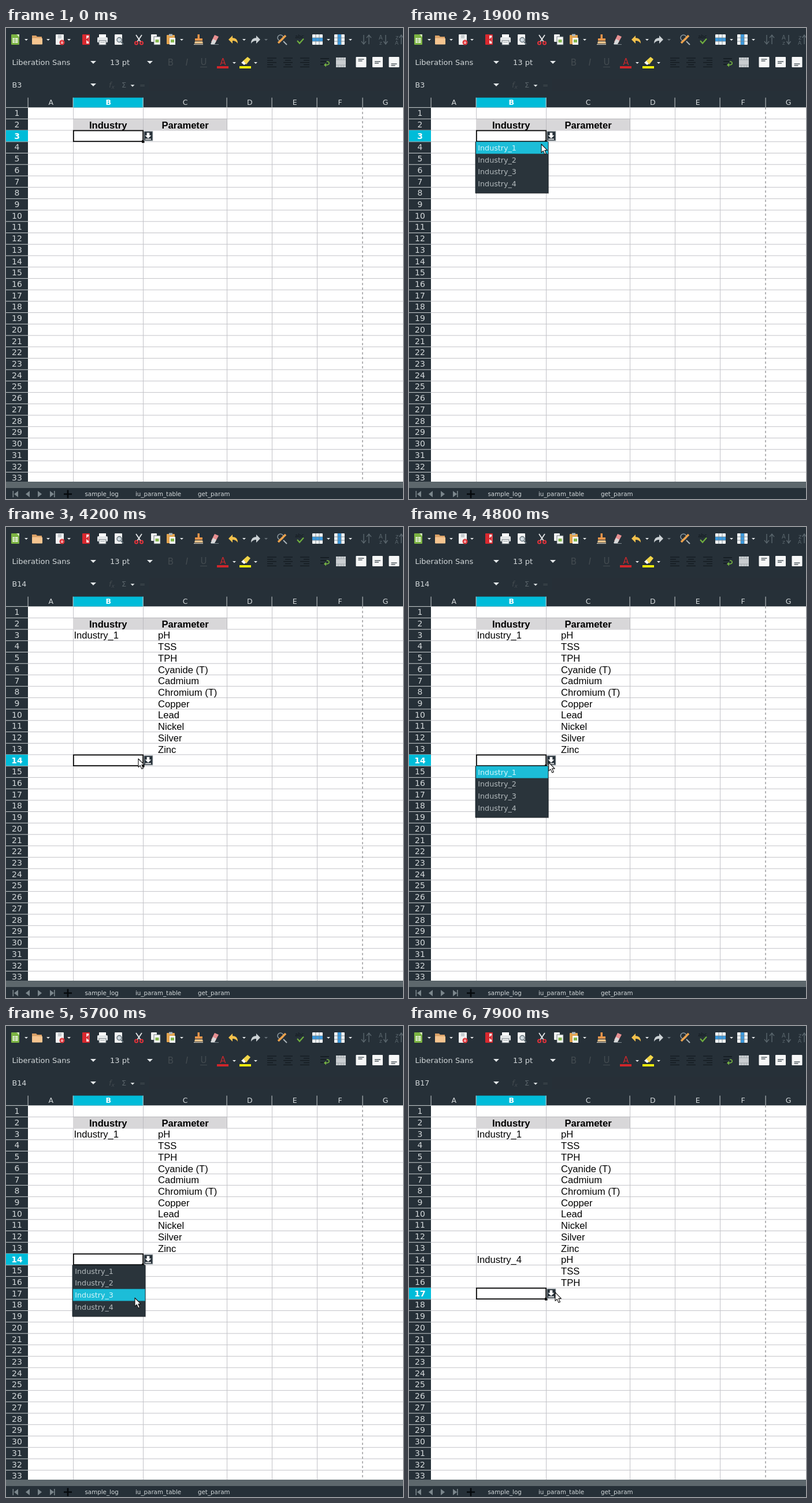
Animation of 687x815 px, one loop 8 s. Source, as an HTML page:

```html
<!DOCTYPE html>
<html lang="en">
<head>
<meta charset="utf-8">
<title>Spreadsheet dropdown</title>
<style>
html, body { margin: 0; width: 100%; height: 100%; overflow: hidden; background: #263038; }
svg { display: block; width: 687px; height: 815px; }
text { white-space: pre; }
.ui { font-family: "DejaVu Sans", sans-serif; }
.cell { font-family: "Liberation Sans", Arial, sans-serif; font-size: 16.6px; fill: #000; }
</style>
</head>
<body>
<svg viewBox="0 0 687 815" xmlns="http://www.w3.org/2000/svg">
  <g id="base"></g>
  <g id="live"></g>
</svg>
<script>
const DARK = '#263038', CYAN = '#00bcd9', PALE = '#d3d8da', DIM = '#12191e', FADED = '#434b50', GRID = '#c3c3c8';
const TOP = 137.2, ROW = 19.72, ITEM = 20.6, LOOP = 8000;
const COLS = [38, 116, 237, 382, 460, 538, 617, 695];
const PARAMS = ['pH', 'TSS', 'TPH', 'Cyanide (T)', 'Cadmium', 'Chromium (T)', 'Copper', 'Lead', 'Nickel', 'Silver', 'Zinc'];

const rowTop = n => TOP + ROW * (n - 1);
const rect = (x, y, w, h, fill, more = '') => `<rect x="${x}" y="${y}" width="${w}" height="${h}" fill="${fill}" ${more}/>`;
const path = (d, fill, more = '') => `<path d="${d}" fill="${fill}" ${more}/>`;
const stroke = (d, color, w = 1, more = '') => path(d, 'none', `stroke="${color}" stroke-width="${w}" ${more}`);
const circle = (x, y, r, fill, more = '') => `<circle cx="${x}" cy="${y}" r="${r}" fill="${fill}" ${more}/>`;
const ui = (s, x, y, size, fill = PALE, more = '') => `<text class="ui" x="${x}" y="${y}" font-size="${size}" fill="${fill}" ${more}>${s}</text>`;
const cell = (s, x, n, more = '') => `<text class="cell" x="${x}" y="${rowTop(n) + 16.8}" ${more}>${s}</text>`;
const caret = (x, y, w = 3.5, fill = '#e4e8ea') => path(`M${x - w} ${y - w / 2}h${2 * w}l${-w} ${w}z`, fill);
const MID = 'text-anchor="middle"', BOLD = 'font-weight="bold"', MID_BOLD = MID + ' ' + BOLD;

function page(x, y, w = 14, h = 18) {
  return rect(x, y, w, h, '#f1f2f2', 'rx="1"');
}

function tableIcon(x, vertical) {
  let s = rect(x - 9, 11, 18, 18, '#f3f5f6', 'rx="1"');
  s += vertical ? rect(x - 3, 11, 6, 18, '#3a9ae0') : rect(x - 9, 17, 18, 6, '#3a9ae0');
  return s + stroke(`M${x - 3} 11v18M${x + 3} 11v18M${x - 9} 17h18M${x - 9} 23h18`, '#6a7b86', .8);
}

function topIcons() {
  const sort = '#5a666d';
  let s = rect(9, 11, 14, 18, '#7bb342', 'rx="1"') + path('M18 11h5v5z', '#d4ecb8')
    + rect(11.5, 17.5, 9, 8, '#fff') + stroke('M11.5 20h9M11.5 22.8h9M15.5 17.5v8', '#7bb342');
  s += path('M45 13h7l2 2h8v13h-17z', '#d9a066') + rect(45, 17.5, 18, 11, '#f5c590', 'rx="1"');
  s += page(86, 11) + path('M90 12h6v6h-6z', '#c8cdd0') + circle(97, 25, 4.5, '#e0393e')
    + stroke('M97 22.5v4.5M95 25l2 2l2-2', '#fff');
  s += rect(132, 11, 13, 18, '#d9282f', 'rx="1"') + rect(139, 13, 4.5, 14, '#f3dcdc')
    + path('M138 20l5-4v8z', '#d9282f');
  s += rect(161, 11, 12, 6, '#fff') + rect(158, 16, 18, 9, '#e3e6e8', 'rx="1.5"')
    + rect(161, 22, 12, 7, '#fff', 'stroke="#6c767c"') + stroke('M163 25h8', '#8a9499');
  s += page(188, 11, 13) + circle(196, 20.5, 4, '#cfd9df', 'stroke="#5c6a72" stroke-width="1.3"')
    + stroke('M199 24l4 4', '#5c6a72', 2);
  s += stroke('M225 12l8 12M235 12l-8 12', '#e5e7e8', 1.8) + circle(225.5, 26, 2.5, 'none', 'stroke="#e0323a" stroke-width="2"')
    + circle(234.5, 26, 2.5, 'none', 'stroke="#e0323a" stroke-width="2"');
  s += page(251, 11, 10, 13) + rect(256, 15, 11, 14, '#f5f6f6', 'stroke="#566168" stroke-width=".8"')
    + rect(258.5, 20, 6, 5, '#86b84f');
  s += rect(278, 12, 14, 16, '#e3a44f', 'rx="1"') + rect(282, 10.5, 6, 3.5, '#aeb6ba')
    + rect(283, 17, 10, 12, '#f5f6f6') + rect(285, 20, 6, 5, '#86b84f');
  s += path('M331.5 11h3.5v7h5v4h-13v-4h4.5z', '#e8954a') + path('M327 23h13l1 4h-15z', '#e7c08a') + stroke('M325 28.5h16', '#f0e3cf');
  s += path('M361 12l7 3-6 11-7-2z', '#e78f91') + path('M358 19l6 3-3 6h-7z', '#d7d9da') + stroke('M355 28.5h13', '#7d888e');
  s += path('M385 20l7-7v4q9 0 9 10q-3-5-9-5v5z', '#f4c14c');
  s += path('M440 20l-7-7v4q-9 0-9 10q3-5 9-5v5z', '#cbd1d4');
  s += circle(475, 17, 5, 'none', 'stroke="#8a969d" stroke-width="1.6"') + stroke('M471 26l13-13', '#eca24d', 3.5)
    + stroke('M480 23l6 6', '#aab3b8', 2);
  s += ui('abc', 508, 18, 8.5, DIM, MID) + stroke('M504 22l4 4.5l7-8', '#6fae3f', 2.2);
  s += tableIcon(539, false) + tableIcon(577, true);
  s += stroke('M619 12v15M615 23l4 5l4-5M628 28v-15M624 17l4-5l4 5', sort, 1.4);
  s += ui('A', 645, 20, 10, sort) + ui('z', 646, 29, 9, sort) + stroke('M657 12v15M653.5 23l3.5 5l3.5-5', sort, 1.4);
  s += ui('z', 674, 20, 10, sort) + ui('A', 673, 29, 9, sort) + stroke('M684 28v-15M680.5 17l3.5-5l3.5 5', sort, 1.4);
  for (const x of [35, 73, 109, 304, 412, 558, 596]) s += caret(x, 20.5, 3);
  return s + caret(450, 20.5, 3, '#667178');
}

function formatIcons() {
  let s = ui('Liberation Sans', 10.5, 63.5, 13) + caret(151, 59.5, 5)
    + ui('13 pt', 180, 63.5, 13) + caret(249, 59.5, 5);
  s += ui('B', 285, 64.5, 15, FADED, MID) + ui('I', 313, 64.5, 15, FADED, MID + ' font-style="italic"')
    + ui('U', 342, 63.5, 15, FADED, MID) + stroke('M336 67.5h12', FADED);
  s += ui('A', 375.5, 64, 15, '#c0282d', MID) + rect(365, 66, 20, 4, '#d0252b');
  s += path('M409 58l9-8l5 4l-7 9z', '#f3d64a') + path('M407 60l4-3l4 5l-3 2z', '#f5f5f5') + rect(404, 66, 20, 4, '#f7f30a');
  s += caret(395, 60.5, 3) + caret(432, 60.5, 3);
  [460, 488, 517].forEach((x, k) => {
    for (let i = 0; i < 5; i++) {
      const w = i % 2 ? 10 : 16, left = x - 8 + (16 - w) * k / 2;
      s += rect(left, 51.5 + i * 3.8, w, 1.2, DIM);
    }
  });
  s += stroke('M544 53h15M544 58h10M544 63h6', DIM, 1.5) + stroke('M555 58q5 0 4 4q-1 2-6 2', '#74b043', 1.7)
    + path('M554 60.5v7l-4-3.5z', '#74b043');
  s += rect(571, 51, 17, 17, '#c9cdd0') + stroke('M571 55h17M571 64h17M575 51v4M580 51v4M584 51v4M575 64v4M580 64v4M584 64v4', '#9aa2a6', .8);
  [614.5, 643, 671.5].forEach((x, k) => {
    s += rect(x - 9, 50, 18, 18, '#f6f7f7', 'rx="1"') + rect(x - 5, 53.5 + k * 4, 10, 1.3, '#39444b') + rect(x - 5, 56.3 + k * 4, 7, 1.3, '#39444b');
  });
  return s;
}

function formulaBar() {
  return caret(151, 98.5, 5) + ui('f<tspan font-size="9" dy="2">x</tspan>', 178, 103, 13, FADED, 'font-style="italic"')
    + ui('Σ', 204, 103, 13, '#5a646a', MID) + caret(219, 100, 3.5) + ui('=', 236, 103, 12, FADED, MID)
    + rect(247, 89, 440, 20, '#272f37');
}

function bottomBar() {
  const nav = '#7b868c';
  let s = rect(0, 785, 687, 11, '#5d676c') + rect(0, 796, 687, 19, DARK);
  s += rect(11.5, 801, 1.6, 11, nav) + path('M21 801v11l-7-5.5z', nav) + path('M41 801v11l-7-5.5z', nav)
    + path('M55 801v11l7-5.5z', nav) + path('M76 801v11l7-5.5z', nav) + rect(83, 801, 1.6, 11, nav);
  s += stroke('M100 806.5h14M107 799.5v14', '#05090c', 2.6);
  return s + ui('sample_log', 136.5, 810, 10.3) + ui('iu_param_table', 224, 810, 10.3) + ui('get_param', 332, 810, 10.3);
}

function sheet() {
  let s = rect(38, 137.4, 649, 648, '#fff');
  let lines = '', heads = '';
  for (let n = 1; n <= 33; n++) {
    const y = rowTop(n) + .4;
    if (n > 1) lines += `M38 ${y}H687`;
    heads += `M0 ${y}H38`;
    s += ui(n, 19, rowTop(n) + 15, 14, PALE, MID);
  }
  COLS.slice(1, 6).forEach(x => lines += `M${x + .5} 137V785`);
  s += stroke(lines, GRID);
  s += stroke('M617 137V785', '#77777c', 1.1, 'stroke-dasharray="4 4"');
  s += rect(116, 157, 266.5, 20, '#d8d7d9') + stroke('M116 157.4H382.5V177M237.5 157V177', '#bab9bd');
  s += cell('Industry', 176.7, 2, MID_BOLD) + cell('Parameter', 310, 2, MID_BOLD);
  s += rect(116, 120.5, 121.5, 17, CYAN);
  [...'ABCDEFG'].forEach((c, i) => {
    const mid = i === 6 ? 656.5 : (COLS[i] + COLS[i + 1]) / 2 + .7;
    s += ui(c, mid, 132.5, 12.5, i === 1 ? '#fff' : PALE, i === 1 ? MID_BOLD : MID);
    heads += `M${COLS[i] + .1} 120.5V137.5`;
  });
  return s + stroke(heads, '#cdd2d4');
}

document.getElementById('base').innerHTML =
  rect(0, 0, 687, 815, DARK) + topIcons() + formatIcons() + formulaBar() + sheet() + bottomBar();

// Pointer stops: time, x, y
const POINTER = [
  [0, 300, 830], [900, 262, 447], [1400, 244, 188], [1600, 244, 188], [1900, 229, 201], [2200, 229, 204],
  [2700, 205, 371], [3200, 199, 355], [3600, 205, 396], [3900, 207, 402], [4200, 229, 401], [4500, 244, 405],
  [4700, 244, 405], [5100, 230, 421], [5400, 224, 457], [6000, 222, 484], [6200, 222, 484], [6500, 222, 476],
  [6700, 222, 476], [6800, 213, 476], [7100, 216, 462], [7500, 216, 462], [7900, 253, 461]
];

function pointerAt(t) {
  const i = POINTER.findIndex(p => p[0] >= t);
  if (i <= 0) return POINTER[i < 0 ? POINTER.length - 1 : 0].slice(1);
  const [t0, x0, y0] = POINTER[i - 1], [t1, x1, y1] = POINTER[i];
  const u = (t - t0) / (t1 - t0), k = u * u * (3 - 2 * u);
  return [x0 + (x1 - x0) * k, y0 + (y1 - y0) * k];
}

function popup(row, py) {
  const y = rowTop(row + 1) + .6;
  const hover = Math.max(0, Math.min(3, Math.floor((py - y) / ITEM)));
  let s = rect(115, y + 1, 127, 89, '#000', 'opacity=".25"') + rect(115, y, 126, 88.5, '#2a343b', 'stroke="#182026" stroke-width=".8"');
  s += rect(116, y + hover * ITEM, 124.5, ITEM, '#1cbdd8', 'stroke="#13899c" stroke-width=".8" stroke-dasharray="1 1"');
  for (let i = 0; i < 4; i++)
    s += ui('Industry_' + (i + 1), 119.3, y + 15 + i * ITEM, 12.7, i === hover ? '#d6f6fb' : '#b3babd');
  return s;
}

function selection(row) {
  const y = rowTop(row);
  let s = rect(0, y + .4, 38, ROW - .5, CYAN) + ui(row, 19, y + 15, 14, '#fff', MID_BOLD);
  s += rect(116.8, y + .9, 120.4, 18.7, 'none', 'stroke="#000" stroke-width="1.8"') + rect(235, y + 17.6, 4.5, 4.5, '#000');
  s += rect(238.8, y + 2.3, 15, 16, '#28323a', 'stroke="#8f989d" stroke-width="1"');
  return s + path(`M243.7 ${y + 4.5}h4.6v4.5h3.2l-5.5 5.3l-5.5-5.3h3.2z`, '#fff') + rect(241, y + 15, 10, 1.6, '#fff');
}

function frame(t) {
  const first = t >= 2200, second = t >= 6300;
  const row = t < 3800 ? 3 : t < 7500 ? 14 : 17;
  const open = (t >= 1600 && t < 2200) || (t >= 4700 && t < 6300);
  const value = row === 3 && first ? 'Industry_1' : row === 14 && second ? 'Industry_4' : '';
  const [x, y] = pointerAt(t);
  let s = ui('B' + row, 10.5, 103, 12.7) + ui(value, 252, 102.5, 13);
  if (first) s += cell('Industry_1', 117.5, 3) + PARAMS.map((p, i) => cell(p, 263, 3 + i)).join('');
  if (second) s += cell('Industry_4', 117.5, 14) + PARAMS.slice(0, 3).map((p, i) => cell(p, 263, 14 + i)).join('');
  s += selection(row);
  if (open) s += popup(row, y);
  return s + path('M0 0V14.6L3.3 11.6L5.9 17.6L8.5 16.5L5.9 10.6H10.4Z', '#fff',
    `stroke="#111" stroke-width="1.1" stroke-linejoin="round" transform="translate(${x} ${y})"`);
}

const live = document.getElementById('live');
let shown = -1;
function tick(now) {
  const t = Math.floor(now % LOOP / 100) * 100;
  if (t !== shown) live.innerHTML = frame(shown = t);
  requestAnimationFrame(tick);
}
tick(performance.now());
</script>
</body>
</html>
```
